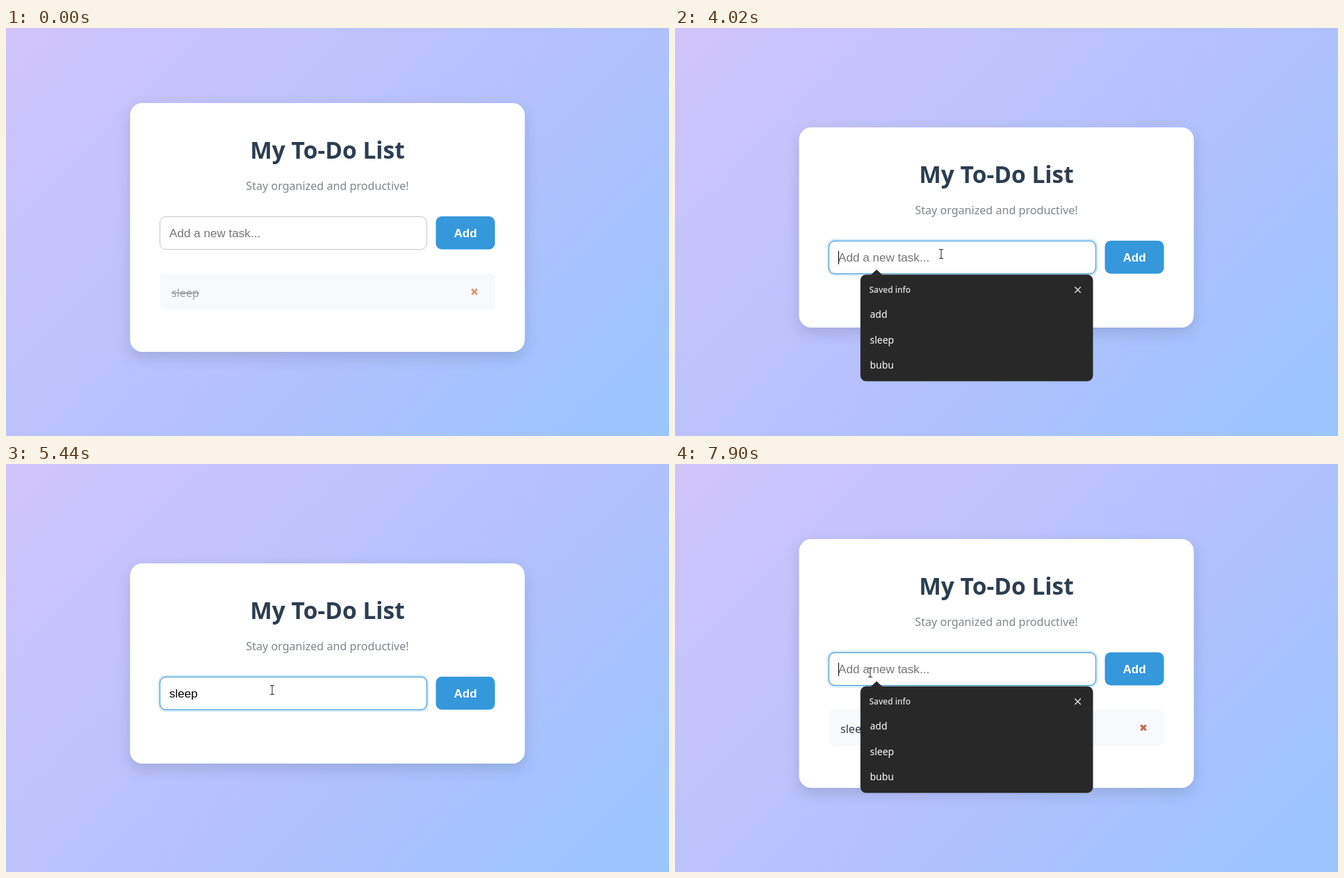
Write an HTML page that moves like this. It is 954 by 587 pixels and loops after 8 s.

```html
<!DOCTYPE html>
<html lang="en">
<head>
<meta charset="utf-8">
<title>To-do list</title>
<style>
  html, body { margin: 0; width: 100%; height: 100%; overflow: hidden; }
  body { background: linear-gradient(135deg, #d1c4fb, #b0c1fd 60%, #99c5fd); }
  svg { display: block; width: 954px; height: 587px; }
  text { font-family: "Noto Sans", "Open Sans", sans-serif; white-space: pre; }
  .field { font: 17.1px "Liberation Sans", Arial, sans-serif; }
  .title { font-size: 33.5px; font-weight: 700; fill: #2c3e50; text-anchor: middle; }
  .subtitle { font-size: 16.12px; fill: #7f868b; text-anchor: middle; }
  .button { font-weight: 700; fill: #fff; text-anchor: middle; }
  .label { font-size: 16.13px; }
  .row { font-size: 13.95px; fill: #fff; }
  .heading { font: 600 11.9px "Open Sans", "Noto Sans", sans-serif; fill: #dcdcdc; }
  #card { filter: drop-shadow(0 8px 10px rgba(0, 0, 0, .12)); }
</style>
</head>
<body>
<svg viewBox="0 0 954 587">
  <rect id="card" x="178.5" width="568" rx="17.5" fill="#fff"/>
  <g id="content">
    <text class="title" x="462.5" y="188">My To-Do List</text>
    <text class="subtitle" x="462.5" y="232.5">Stay organized and productive!</text>
    <rect id="ring" x="220" y="270" width="387" height="50" rx="10" fill="none" stroke="#3498db" stroke-width="3"/>
    <rect x="221.5" y="271.5" width="384" height="47" rx="8.5" fill="#fff" stroke="#c4c6c9"/>
    <rect id="border" x="221.5" y="271.5" width="384" height="47" rx="8.5" fill="none" stroke="#3498db"/>
    <text id="value" class="field" x="235" y="300.5"></text>
    <rect id="caret" y="286" width="1" height="19" fill="#000"/>
    <rect x="618.5" y="271" width="85" height="47.5" rx="8.5" fill="#3498db"/>
    <rect id="hover" x="618.5" y="271" width="85" height="47.5" rx="8.5" fill="#2980b9"/>
    <text class="field button" x="661" y="300.5">Add</text>
    <g id="item">
      <rect x="221.5" y="353" width="482" height="52.5" rx="7.5" fill="#f8f9fb"/>
      <text id="label" class="label" x="238" y="387">sleep</text>
      <path id="strike" d="M238 381.3h40" stroke="#9c9ca1" stroke-width="1.5"/>
      <path id="remove" d="M670.2 375.6l7.6 7.6m0-7.6l-7.6 7.6" stroke-width="3"/>
    </g>
    <g id="menu">
      <path d="M281.5 320.5L290 312.5L298.500 320.5Z" fill="#282828"/>
      <rect id="panel" x="267" y="320" width="334.200" rx="8" fill="#282828" stroke="#3b3b3b" stroke-width=".6"/>
      <text class="heading" x="279.5" y="346">Saved info</text>
      <path d="M575.300 337.500l8.500 8.500m0-8.500l-8.500 8.500" stroke="#eee" stroke-width="1.200"/>
      <g id="rows"></g>
    </g>
  </g>
  <g id="cursor" stroke-linejoin="round">
    <path id="arrow" d="M.5 .5V14.500L3.700 11.500L6.200 16.800L8.300 15.900L5.900 10.700H10.300Z" fill="#fff" stroke="#1c2230"/>
    <path id="beam" d="M-3 -6.500h2.300l.7 .7l.7 -.7h2.300M0 -6V6M-3 6.500h2.300l.7 -.7l.7 .7h2.300" fill="none" stroke="#333" stroke-width="1.100"/>
    <path id="hand" d="M-1.500 1.500q1.500-2 3 0v7l7 1.500q2 .5 2 2.500l-1.500 8h-9l-5-7q-1-2.500 1.500-2l2 2z" fill="#fff" stroke="#222"/>
  </g>
</svg>
<script>
  const LOOP = 8000, REMOVED = 2470, ADDED = 6880;
  const FOCUS = 2950, BLUR = 6740, REFOCUS = 7290, MENU_CLOSE = 4815;
  const KEY_TIMES = [4150, 4300, 4440, 4580, 4815];
  const CARET_OFF = [[3490, 4020], [5440, 5970], [6500, 6740], [7370, 7900]];
  const CURSOR = [
    [580, 718, 575], [650, 640, 500], [790, 430, 420], [930, 240, 365],
    [1000, 222, 345], [1140, 300, 318], [1290, 370, 302], [1630, 370, 302],
    [1750, 473, 329], [1960, 580, 352], [2170, 655, 375], [2400, 674, 387],
    [2470, 675, 385], [2540, 675, 385], [2660, 540, 350], [2820, 383, 325],
    [5890, 383, 325], [6020, 440, 345], [6160, 560, 366], [6300, 640, 362],
    [6440, 665, 345], [6650, 661, 337], [6880, 661, 337], [7020, 480, 318],
    [7160, 300, 302], [7230, 281, 300]
  ];

  const el = Object.fromEntries([...document.querySelectorAll("[id]")].map(n => [n.id, n]));
  const set = (node, attrs) => Object.entries(attrs).forEach(([k, v]) => node.setAttribute(k, v));
  const show = (node, visible) => node.setAttribute("visibility", visible ? "inherit" : "hidden");
  const within = (v, a, b) => v >= a && v < b;
  const ramp = (t, start, length) => Math.min(1, Math.max(0, (t - start) / length));

  function cursorAt(t) {
    const i = CURSOR.findIndex(k => k[0] > t);
    if (i < 0) return CURSOR[CURSOR.length - 1].slice(1);
    if (i === 0) return CURSOR[0].slice(1);
    const [t0, x0, y0] = CURSOR[i - 1], [t1, x1, y1] = CURSOR[i];
    const p = (t - t0) / (t1 - t0);
    return [x0 + (x1 - x0) * p, y0 + (y1 - y0) * p];
  }

  function drawInput(t) {
    const typed = t < ADDED ? "sleep".slice(0, KEY_TIMES.filter(k => k <= t).length) : "";
    el.value.textContent = typed || "Add a new task...";
    el.value.setAttribute("fill", typed ? "#000" : "#757575");

    const glow = ramp(t, FOCUS, 220) - ramp(t, BLUR, 220) + ramp(t, REFOCUS, 200);
    el.ring.setAttribute("opacity", glow * 0.22);
    el.border.setAttribute("opacity", glow);

    const focused = within(t, FOCUS, BLUR) || t >= REFOCUS;
    show(el.caret, focused && !CARET_OFF.some(([a, b]) => within(t, a, b)));
    el.caret.setAttribute("x", 235 + (typed ? Math.round(el.value.getComputedTextLength()) : 0));
  }

  function drawMenu(t) {
    const opacity = ramp(t, FOCUS, 210) - ramp(t, MENU_CLOSE, 215) + ramp(t, REFOCUS, 210);
    const filtered = within(t, KEY_TIMES[0], BLUR);
    const words = filtered ? ["sleep"] : ["add", "sleep", "bubu"];
    const scale = 1 - 0.06 * (1 - opacity);
    set(el.menu, {
      opacity,
      transform: `translate(434 320) scale(${scale}) translate(-434 -320)`
    });
    show(el.menu, opacity > 0);
    el.panel.setAttribute("height", 43.5 + 36.5 * words.length);
    el.rows.innerHTML = words.map((word, i) =>
      `<text class="row" x="280.5" y="${382 + 36.5 * i}">${word}</text>`).join("");
  }

  function drawItem(t, visible) {
    const done = t < REMOVED;
    show(el.item, visible);
    show(el.strike, visible && done);
    el.label.setAttribute("fill", done ? "#9c9ca1" : "#2f3a47");
    el.remove.setAttribute("stroke", done ? "#df9977" : "#c4674f");
  }

  function drawCursor(t, shift) {
    const step = Math.floor((t - 20) / 70) * 70 + 20;
    const [x, y] = cursorAt(step);
    const overInput = within(x, 222, 606) && within(y - shift, 271, 319);
    const overRemove = t < REMOVED && within(x, 664, 685) && within(y, 368, 392);
    show(el.cursor, t >= 590);
    show(el.beam, overInput && t >= 590);
    show(el.hand, overRemove);
    show(el.arrow, !overInput && !overRemove && t >= 590);
    el.cursor.setAttribute("transform", `translate(${Math.round(x)} ${Math.round(y)})`);
  }

  function draw(t) {
    const expanded = t < REMOVED || t >= ADDED;
    const shift = expanded ? 0 : 35;
    set(el.card, { y: 108 + shift, height: 358 - 2 * shift });
    el.content.setAttribute("transform", `translate(0 ${shift})`);
    el.hover.setAttribute("opacity", ramp(t, 6370, 220) - ramp(t, ADDED, 200));
    drawInput(t);
    drawItem(t, expanded);
    drawMenu(t);
    drawCursor(t, shift);
  }

  const start = performance.now();
  function tick() {
    draw((performance.now() - start) % LOOP);
    requestAnimationFrame(tick);
  }
  tick();
</script>
</body>
</html>
```
